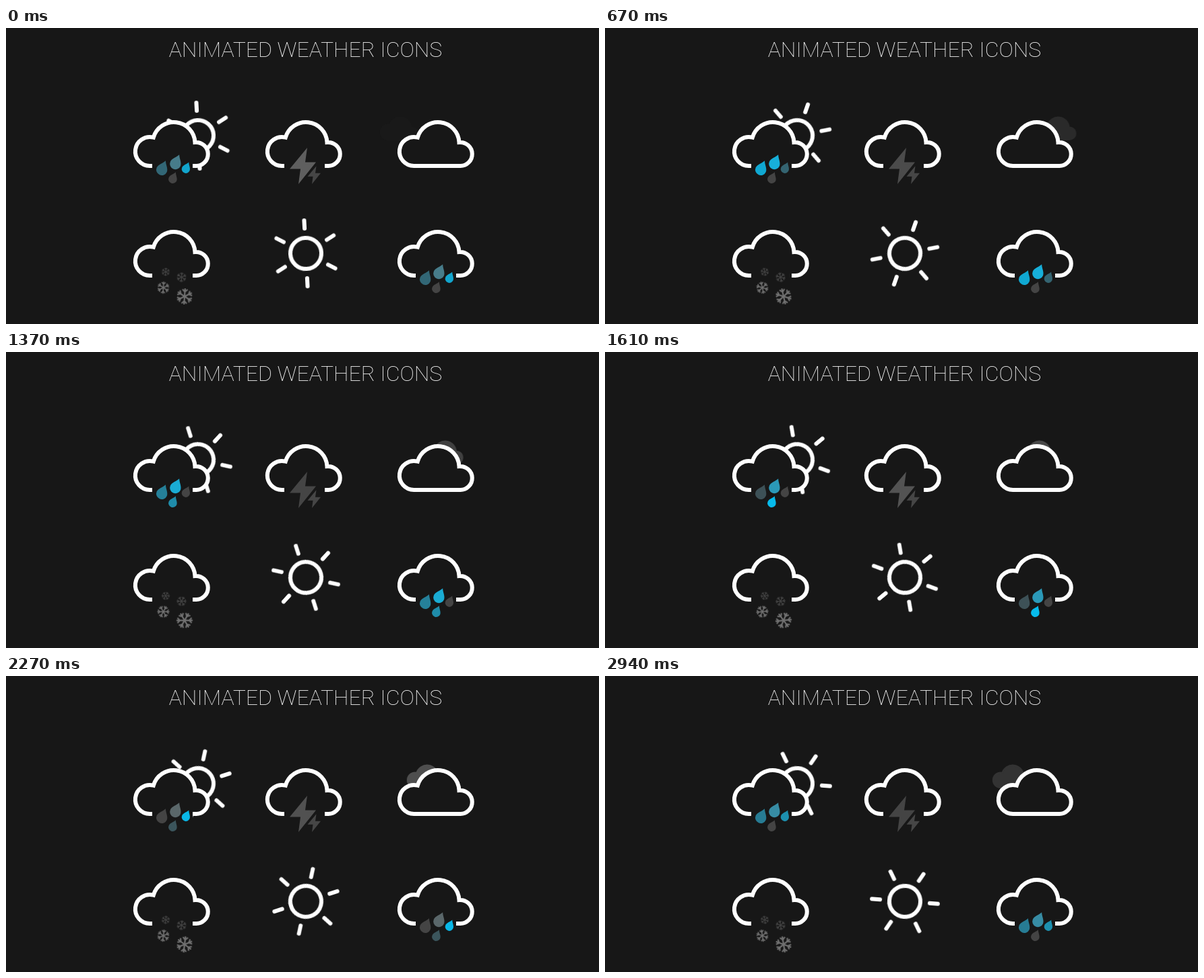
Write an HTML page that moves like this. It is 880 px wide and 440 px high and loops after 3040 ms.

```html
<!DOCTYPE html>
<html lang="en">
<head>
<meta charset="utf-8">
<title>Animated weather icons</title>
<style>
  html, body { margin: 0; width: 100%; height: 100%; overflow: hidden; background: #171717; }
  svg { display: block; width: 880px; height: 440px; --t: 0; }
  text { font: 100 32px Roboto, sans-serif; fill: #fff; text-anchor: middle; }
  .line { fill: #171717; stroke: #fff; stroke-width: 6; }
  .gap { fill: #171717; }

  /* Paused animations, placed in time by --t (ms) plus a phase. */
  .spin, .melt, .drift, .drop, .bolt {
    --phase: 0;
    animation: 1s linear infinite paused;
    animation-delay: calc((var(--t) + var(--phase)) * -1ms);
  }
  .spin { animation-name: spin; animation-duration: 10880ms; }
  .melt { animation-name: melt; animation-duration: 14400ms; }
  .drift { --phase: 3546; animation-name: drift; animation-duration: 3611ms; }
  .bolt { animation-name: flash; animation-duration: 1813ms; }
  .drop { --phase: 360; animation-duration: 2720ms; }
  .left { animation-name: left; }
  .middle { animation-name: middle; }
  .right { animation-name: right; }
  .low { animation-name: low; }

  @keyframes spin { from { transform: rotate(-3deg); } to { transform: rotate(357deg); } }
  @keyframes melt { from { transform: rotate(4deg); } to { transform: rotate(-356deg); } }
  @keyframes drift {
    0% { transform: translate(690px, 149px); opacity: 0; }
    55% { opacity: 1; }
    100% { transform: translate(582.4px, 149px); opacity: 0; }
  }
  @keyframes flash { 0%, 100% { fill: #5f5f5f; } 50%, 75% { fill: #444; } }
  @keyframes left { 0%, 75%, 100% { fill: #444; } 50% { fill: #00c8ff; } }
  @keyframes middle { 0%, 100% { fill: #606060; } 50% { fill: #00c8ff; } }
  @keyframes right { 0%, 100% { fill: #00c8ff; } 50%, 75% { fill: #444; } }
  @keyframes low { 0%, 50%, 100% { fill: #444; } 75% { fill: #00c8ff; } }
</style>
</head>
<body>
<svg id="stage" viewBox="0 0 880 440">
  <defs>
    <path id="cloud" d="M213.5 205A21.5 21.5 0 1 1 218.8 162.7A31.5 31.5 0 0 1 280.5 170A17.55 17.55 0 1 1 281.5 205Z"/>
    <path id="drop" transform="rotate(23)" d="M0-14.5C2-9.5 8.2-5 8.2 .3A8.2 8.2 0 1 1-8.2 .3C-8.2-5-2-9.5 0-14.5Z"/>
    <path id="bolt" d="M447 178L421 209.5H437L434 232L460 199.5H444Z"/>
    <path id="rays" d="M0-37V-49M0 37V49"/>
    <g id="sun" fill="none" stroke="#fff" stroke-width="6" stroke-linecap="round">
      <circle r="23"/>
      <use href="#rays"/>
      <use href="#rays" transform="rotate(60)"/>
      <use href="#rays" transform="rotate(120)"/>
    </g>
    <path id="arms" d="M0-12V12M-3.8-10.6L0-6.8L3.8-10.6M-3.8 10.6L0 6.8L3.8 10.6"/>
    <g id="flake" fill="none" stroke-width="2.1">
      <use href="#arms"/>
      <use href="#arms" transform="rotate(60)"/>
      <use href="#arms" transform="rotate(120)"/>
    </g>
  </defs>

  <text x="444.5" y="43">ANIMATED WEATHER ICONS</text>

  <!-- sun shower -->
  <g transform="translate(285 160)"><g class="spin"><use href="#sun"/></g></g>
  <use href="#cloud" class="line"/>
  <rect class="gap" x="217" y="195" width="60" height="36"/>
  <g>
    <use href="#drop" class="drop left" x="231.3" y="210.5"/>
    <use href="#drop" class="drop middle" x="251.5" y="201.7"/>
    <use href="#drop" class="drop right" transform="translate(267 209.5) scale(.75)"/>
    <use href="#drop" class="drop low" transform="translate(247.5 224.5) scale(.77)"/>
  </g>

  <!-- thunder -->
  <g>
    <use href="#cloud" class="line" x="196"/>
    <rect class="gap" x="413" y="195" width="60" height="36"/>
    <use href="#bolt" class="bolt"/>
    <use href="#bolt" fill="#464646" transform="translate(237 117.5) scale(.5 .493)"/>
  </g>

  <!-- cloudy -->
  <g class="drift">
    <use href="#cloud" fill="#575757" stroke="#575757" stroke-width="6" transform="scale(.5) translate(-248 -172)"/>
  </g>
  <use href="#cloud" class="line" x="392"/>

  <!-- snow -->
  <use href="#cloud" class="line" y="163"/>
  <rect class="gap" x="217" y="358" width="60" height="36"/>
  <g stroke="#444">
    <g transform="translate(237 362.5) scale(.5)"><g class="melt"><use href="#flake"/></g></g>
    <g transform="translate(260.5 370.5) scale(.6)"><g class="melt"><use href="#flake"/></g></g>
  </g>
  <g stroke="#707070">
    <g transform="translate(233.5 386) scale(.75)"><g class="melt"><use href="#flake"/></g></g>
    <g transform="translate(265 399)"><g class="melt"><use href="#flake"/></g></g>
  </g>

  <!-- sunny -->
  <g transform="translate(445 335)"><g class="spin"><use href="#sun"/></g></g>

  <!-- rain -->
  <use href="#cloud" class="line" x="392" y="163"/>
  <rect class="gap" x="608" y="358" width="60" height="36"/>
  <g transform="translate(391 163)">
    <use href="#drop" class="drop left" x="231.3" y="210.5"/>
    <use href="#drop" class="drop middle" x="251.5" y="201.7"/>
    <use href="#drop" class="drop right" transform="translate(267 209.5) scale(.75)"/>
    <use href="#drop" class="drop low" transform="translate(247.5 224.5) scale(.77)"/>
  </g>
</svg>
<script>
  const LOOP = 3040, HOLD = 2940;
  const stage = document.getElementById('stage');
  const start = performance.now();

  // The last pose is held until the loop jumps back.
  function tick() {
    const t = Math.min((performance.now() - start) % LOOP, HOLD);
    stage.style.setProperty('--t', t.toFixed(1));
    requestAnimationFrame(tick);
  }
  tick();
</script>
</body>
</html>
```
